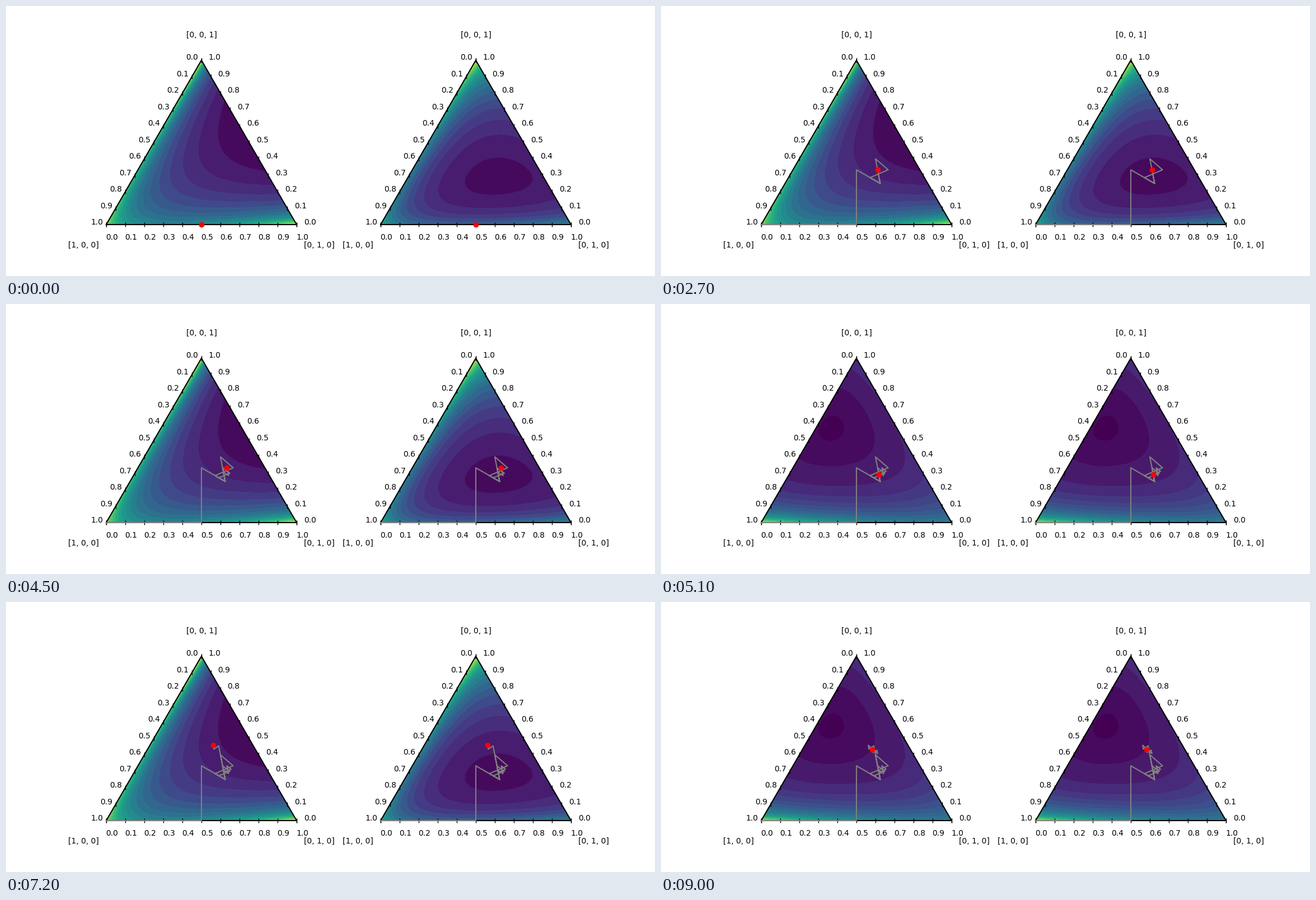
Animation of 1159x483 px, one loop 9300 ms. Source, as a matplotlib script:

```python
import numpy as np
import matplotlib.pyplot as plt
from matplotlib.animation import FuncAnimation
from matplotlib.colors import Normalize

W, H, DPI = 1159, 483, 100
FRAMES, STEP = 31, 300
SHIFT = 490  # distance between the two panels
CORNERS = np.array([(179.0, 391.0), (519.0, 391.0), (349.0, 97.0)])

plt.rcParams["font.family"] = "DejaVu Sans"
plt.rcParams["font.size"] = 10


def to_xy(p):
    """Barycentric coordinates (..., 3) to stage pixels."""
    return np.asarray(p) @ CORNERS


# Conditional-gradient iterates: the running mean of the chosen corners.
picks = [int(c) - 1 for c in "1232321" "2321232321" "3333313" "222313"]
counts = np.cumsum(np.eye(3)[picks], axis=0)
path = to_xy(counts / counts.sum(axis=1, keepdims=True))
start = to_xy([0.5, 0.5, 0])


def second_loss(i):
    """True while the second objective is active."""
    return i == 14 or 17 <= i <= 23 or i >= 27


# Barycentric mesh, denser towards the edges
ramp = np.sin(np.linspace(0, np.pi / 2, 241)) ** 2
x3, s = np.meshgrid(ramp, ramp, indexing="ij")
x2 = (1 - x3) * s
x1 = 1 - x2 - x3
mesh = to_xy(np.stack([x1, x2, x3], axis=-1))


def barrier(a, b, c):
    return 1 / np.sqrt(a * x1 + b * x2 + c * x3)


left_a = barrier(.055, 1, .02) + 1.36 * barrier(.15, .032, 1)
right_a = (barrier(.08, 1, .04) + .85 * barrier(.08, .045, 1)
           + 2.4 * barrier(1, .55, .25))
both_b = (barrier(.027, .1, 1) + .726 * barrier(1, .25, .15)
          + .234 * barrier(.2, 1, .15))

levels_left = 3.255 + .27 * np.arange(21)
levels_right = 5.9 + .25 * np.arange(21)
levels_b = np.r_[2.65, 2.877, 3.005, 3.25, 3.48, np.arange(3.68, 7.8, .2)]

fig = plt.figure(figsize=(W / DPI + 1e-9, H / DPI + 1e-9), dpi=DPI,
                 facecolor="white")
ax = fig.add_axes([0, 0, 1, 1])
ax.set_xlim(0, W)
ax.set_ylim(H, 0)
ax.axis("off")


def draw_field(z, levels, lo, hi, dx):
    z = np.clip(z, levels[0], levels[-1] - 1e-6)
    return ax.contourf(mesh[..., 0] + dx, mesh[..., 1], z, levels=levels,
                       cmap="viridis", norm=Normalize(lo, hi), zorder=1)


def label(x, y, text):
    ax.text(x, y, text, ha="center", va="center", color="black")


def draw_frame(dx):
    """Outline, ticks and labels of one ternary panel."""
    e1, e2, e3 = CORNERS + (dx, 0)
    ring = np.array([e1, e2, e3, e1])
    ax.plot(*ring.T, color="black", lw=1.5, zorder=2)
    for k in range(11):
        f = k / 10
        ends = [(e3, e1), (e2, e3), (e1, e2)]
        ticks = np.array([a + f * (b - a) for a, b in ends])
        ax.plot(*ticks.T, "|", color="black", ms=6, mew=1, zorder=2)
        text = f"{f:.1f}"
        label(dx + 332 - 169.5 * f, 92 + 295 * f, text)
        label(dx + 543 - 170.5 * f, 387 - 295 * f, text)
        label(dx + 189 + 340.5 * f, 414, text)
    label(dx + 349, 51.5, "[0, 0, 1]")
    label(dx + 138, 427.5, "[1, 0, 0]")
    label(dx + 559.5, 427.5, "[0, 1, 0]")


fields_a = [draw_field(left_a, levels_left, *levels_left[[0, -1]], 0),
            draw_field(right_a, levels_right, *levels_right[[0, -1]], SHIFT)]
fields_b = [draw_field(both_b, levels_b, 2.8, 7.6, dx) for dx in (0, SHIFT)]

panels = []
for dx in (0, SHIFT):
    draw_frame(dx)
    trail, = ax.plot([], [], color="gray", lw=1.5, zorder=3)
    dot, = ax.plot([], [], "o", color="red", ms=6, zorder=4)
    panels.append((dx, trail, dot))


def update(i):
    b = second_loss(i)
    for f in fields_a:
        f.set_visible(not b)
    for f in fields_b:
        f.set_visible(b)
    pos = path[i - 1] if i else start
    for dx, trail, dot in panels:
        trail.set_data(path[:i, 0] + dx, path[:i, 1])
        dot.set_data([pos[0] + dx], [pos[1]])
    return []


anim = FuncAnimation(fig, update, frames=FRAMES, interval=STEP,
                     init_func=lambda: update(0), repeat=True, repeat_delay=0)
plt.show()
```
